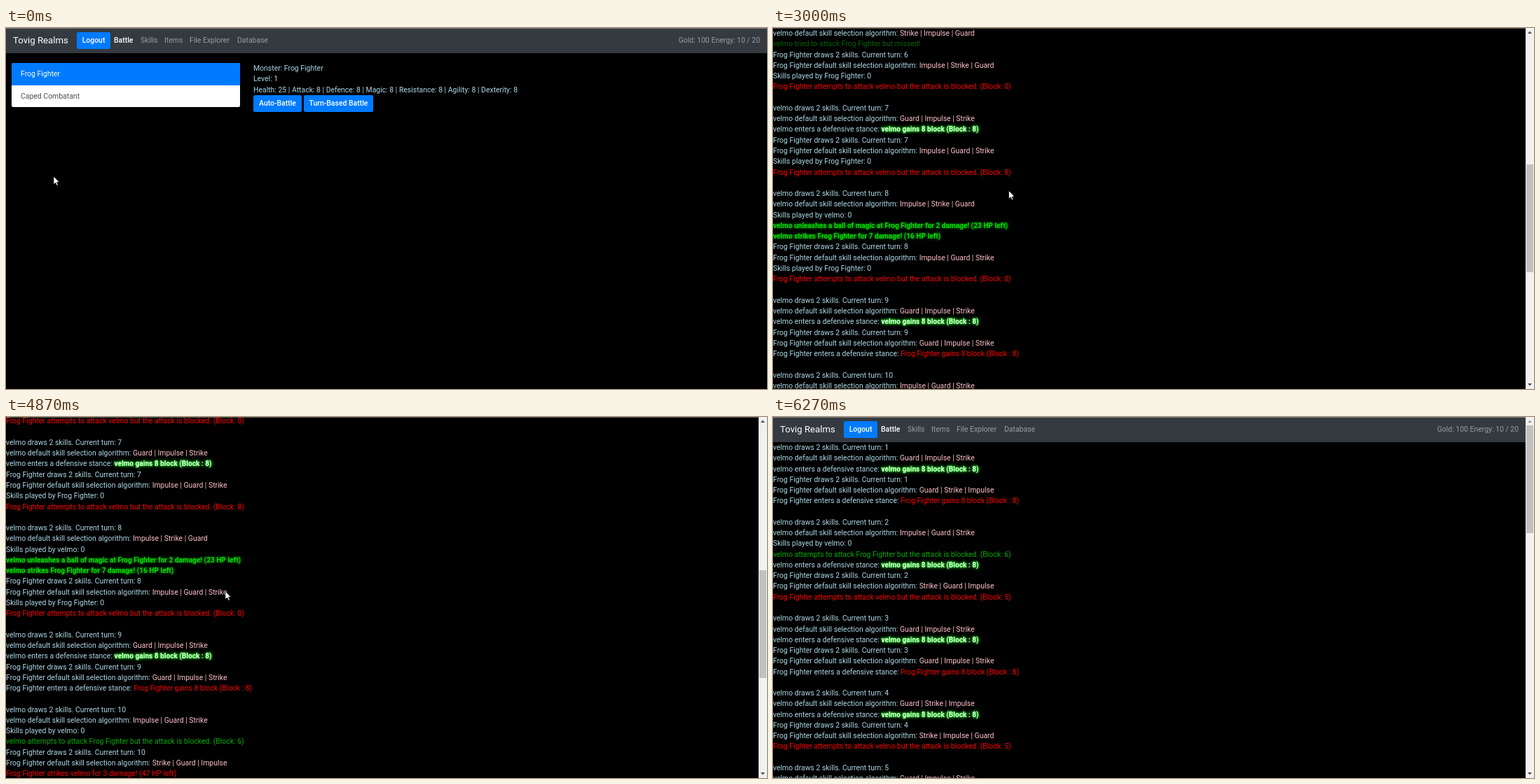
Animation of 1086x516 px, one loop 6670 ms. Source, as an HTML page:

```html
<!DOCTYPE html>
<html lang="en">
<head>
<meta charset="utf-8">
<title>Battle log</title>
<style>
html, body { margin: 0; width: 100%; height: 100%; overflow: hidden; background: #000; }
body { position: relative; font: 10.45px/15.27px Roboto, sans-serif; color: #add8e6; white-space: pre; }
.abs, .nav, .nav span, .btn, #cursor, #cursor path { position: absolute; }
.scene { position: absolute; inset: 0; overflow: hidden; }
.nav { left: 0; top: 0; width: 100%; height: 36px; background: #343a40; color: rgba(255,255,255,.5); }
.nav span { top: 10.3px; }
.nav .brand { left: 10px; font-size: 13.2px; color: #fff; }
.nav .on { color: #fff; font-weight: 500; }
.nav .gold { right: 10px; }
.btn { height: 24px; line-height: 24px; border-radius: 2.5px; background: #007bff; color: #fff; font-weight: 500; text-align: center; }
.btn.hover { background: #0069d9; }
.list { left: 8px; top: 50px; width: 326px; height: 63px; border-radius: 2.5px; overflow: hidden; background: #fff; color: #495057; line-height: 31.5px; text-indent: 13px; }
.list div:first-child { background: #007bff; color: #fff; }
.info { left: 353px; top: 50px; }
#page { position: absolute; left: 0; top: 0; width: 1074px; }
#log { position: absolute; top: 36px; }
#log div { height: 15.27px; }
i { font-style: normal; color: pink; }
.block { font-weight: 600; font-size: 10.1px; color: #e4ffe4; text-shadow: 0 0 3px #0f0, 0 0 5px #0f0; }
.hit { font-weight: 600; font-size: 10.1px; color: #00e000; text-shadow: 0 0 4px #0a0; }
.weak { color: #00b000; }
.miss { color: #006400; }
.foe { color: #f00; }
.foemiss { color: #c80000; }
.crit { font-weight: 600; color: transparent; background: linear-gradient(90deg, orange, #ff0 20%, #1a8a30 38%, #0ce 58%, #33f 76%, #c8f); -webkit-background-clip: text; background-clip: text; }
.fallen { font-weight: 400; text-shadow: 0 3px 2px #f00, 0 6px 3px #a00; }
#bar { position: absolute; right: 0; top: 0; width: 12px; height: 100%; background: #f1f1f1; }
#thumb { position: absolute; left: 1px; top: 12px; width: 10px; height: 154px; background: #c1c1c1; }
#bar svg { position: absolute; left: 0; top: 0; }
.edge { left: 0; top: 0; width: 100%; height: 1px; background: rgba(255,255,255,.35); }
#cursor { left: 0; top: 0; overflow: visible; }
</style>
</head>
<body>
<div class="scene" id="lobby">
  <div class="nav"></div>
  <div class="abs list"><div>Frog Fighter</div><div>Caped Combatant</div></div>
  <div class="abs info">Monster: Frog Fighter
Level: 1
Health: 25 | Attack: 8 | Defence: 8 | Magic: 8 | Resistance: 8 | Agility: 8 | Dexterity: 8</div>
  <div class="btn" id="auto" style="left:353px;top:96px;width:69px">Auto-Battle</div>
  <div class="btn" id="turns" style="left:425px;top:96px;width:99px">Turn-Based Battle</div>
</div>
<div class="scene" id="battle">
  <div id="page"><div class="nav"></div><div id="log"></div></div>
  <div id="bar"><div id="thumb"></div>
    <svg width="12" height="516"><path id="up" d="M3 8L6 4.5 9 8Z"/><path id="down" d="M3 508L6 511.5 9 508Z"/></svg>
  </div>
</div>
<div class="abs edge"></div>
<svg id="cursor" width="1" height="1"><path id="shape" fill="#fff" stroke="#000" stroke-width=".6"/></svg>
<script>
const $ = id => document.getElementById(id);
const HERO = 'velmo', FOE = 'Frog Fighter', MAX = 1139;

const links = [['Battle', 154], ['Skills', 192], ['Items', 226], ['File Explorer', 262], ['Database', 330]];
for (const nav of document.querySelectorAll('.nav')) {
  nav.innerHTML = '<span class="brand">Tovig Realms</span>' +
    '<div class="btn" style="left:101px;top:6px;width:48px">Logout</div>' +
    links.map(([s, x], i) => `<span class="${i ? '' : 'on'}" style="left:${x}px">${s}</span>`).join('') +
    '<span class="gold">Gold: 100 Energy: 10 / 20</span>';
}

// Per turn: skill order and actions of the hero, then of the foe.
// g guard, k skill count, bN blocked, m missed, s/c/u damage,HP left
const turns = ['GIS g/GSI g', 'IGS k b6 g/SGI b5', 'GIS g/GIS g', 'GSI g/SIG b5', 'GIS g/SIG m',
  'SIG m/ISG k b0', 'GIS g/IGS k b8', 'ISG k u2,23 s7,16/IGS k b0', 'GIS g/GIS g', 'IGS k b6/SGI s3,47',
  'GIS g/IGS k b8', 'SGI s7,9/SGI c6,41', 'IGS k u2,7/SIG c6,35', 'SIG s7,0'];
const skills = { G: 'Guard', I: 'Impulse', S: 'Strike' };
const span = (cls, s) => `<span class="${cls}">${s}</span>`;

function act(code, me, other, hero) {
  const [n, hp] = code.slice(1).split(',');
  const left = hp === '0' ? '<i class="fallen">Fallen</i>' : hp + ' HP left';
  const strike = span(hero ? 'hit' : 'foe', `${me} strikes ${other} for ${n} damage! (${left})`);
  switch (code[0]) {
    case 'g': return `${me} enters a defensive stance: ` + span(hero ? 'block' : 'foe', me + ' gains 8 block (Block : 8)');
    case 'k': return `Skills played by ${me}: 0`;
    case 'b': return span(hero ? 'weak' : 'foe', `${me} attempts to attack ${other} but the attack is blocked. (Block: ${n})`);
    case 'm': return span(hero ? 'miss' : 'foemiss', `${me} tried to attack ${other} but missed!`);
    case 'u': return span('hit', `${me} unleashes a ball of magic at ${other} for ${n} damage! (${left})`);
    case 'c': return span('crit', 'Critical hit!') + ' ' + strike;
    default: return strike;
  }
}

const lines = [];
turns.forEach((turn, i) => {
  turn.split('/').forEach((part, side) => {
    const [me, other] = side ? [FOE, HERO] : [HERO, FOE];
    const [order, ...acts] = part.split(' ');
    lines.push(`${me} draws 2 skills. Current turn: ${i + 1}`,
      `${me} default skill selection algorithm: <i>${[...order].map(c => skills[c]).join(' | ')}</i>`,
      ...acts.map(a => act(a, me, other, !side)));
  });
  lines.push('');
});
lines.push(`<u>You defeated ${FOE}!</u>`);
$('log').innerHTML = lines.map(s => `<div>${s}</div>`).join('');

const path = [[0, 68, 212], [200, 68, 212], [330, 42, 180], [470, 70, 125], [600, 190, 98], [730, 296, 96],
  [870, 296, 96], [1070, 370, 104], [1330, 438, 105], [1400, 450, 108], [1530, 395, 108], [1600, 390, 110],
  [1870, 360, 190], [2130, 350, 205], [2470, 335, 229], [2870, 335, 229], [3200, 339, 238], [3870, 339, 238],
  [3930, 343, 246], [4070, 343, 246], [4200, 313, 254], [4600, 313, 254], [5070, 313, 245], [5800, 313, 245],
  [6270, 313, -20]];
const scroll = [[2470, 0], [2530, 4], [2730, 380], [2870, 380], [3200, 980], [3330, 980], [3400, 994],
  [3600, MAX], [4530, MAX], [4930, 600], [5000, 600], [5200, 290], [5730, 80], [6000, 0]];

function at(keys, t) {
  const i = keys.findIndex(k => k[0] > t);
  if (i < 1) return (i ? keys[keys.length - 1] : keys[0]).slice(1);
  const a = keys[i - 1], b = keys[i], p = (t - a[0]) / (b[0] - a[0]);
  return a.slice(1).map((v, j) => v + (b[j + 1] - v) * p);
}

const shapes = {
  arrow: 'M0 0V11.5L2.7 9.2 4.6 13.3 6.3 12.5 4.5 8.5H8Z',
  hand: 'M-1 1.2Q.2 -.4 1.2 1.2V6.5L5 7.3Q6.2 7.8 6 9.3L5.2 13.5V16H-.5V13.8L-3.4 9.5Q-3.8 8.2 -2.4 8.3L-1 9.8Z',
  beam: 'M-3 -6H-.7L0 -5.5 .7 -6H3V-5H.6V5H3V6H.7L0 5.5 -.7 6H-3V5H-.6V-5H-3Z'
};

function draw(now) {
  // the picture advances 15 times a second
  const t = Math.floor(Math.floor((now % 6670 + 7) / 66.7) * 6.67) * 10;
  const lobby = t < 1600;
  $('lobby').style.display = lobby ? '' : 'none';
  $('battle').style.display = lobby ? 'none' : '';

  const [hx, hy] = at(path, t - 70);
  const over = (l, r) => hx >= l && hx <= r && hy >= 96 && hy <= 120;
  $('auto').classList.toggle('hover', over(353, 422));
  $('turns').classList.toggle('hover', over(425, 524));

  const y = Math.round(at(scroll, t)[0]);
  $('page').style.transform = `translateY(${-y}px)`;
  $('thumb').style.top = 12 + y / MAX * 339 + 'px';
  $('up').style.fill = y ? '#505050' : '#a3a3a3';
  $('down').style.fill = y < MAX ? '#505050' : '#a3a3a3';

  const [cx, cy] = at(path, t);
  const hand = lobby && cy < 113 && (cx < 334 || cx >= 353 && cy >= 96);
  const beam = t >= 3930 && t < 4130 || t >= 5000 && t < 5900;
  $('shape').setAttribute('d', shapes[hand ? 'hand' : beam ? 'beam' : 'arrow']);
  $('cursor').style.transform = `translate(${cx}px, ${cy}px)`;
}

const start = performance.now();
(function loop() {
  draw(performance.now() - start);
  requestAnimationFrame(loop);
})();
</script>
</body>
</html>
```
